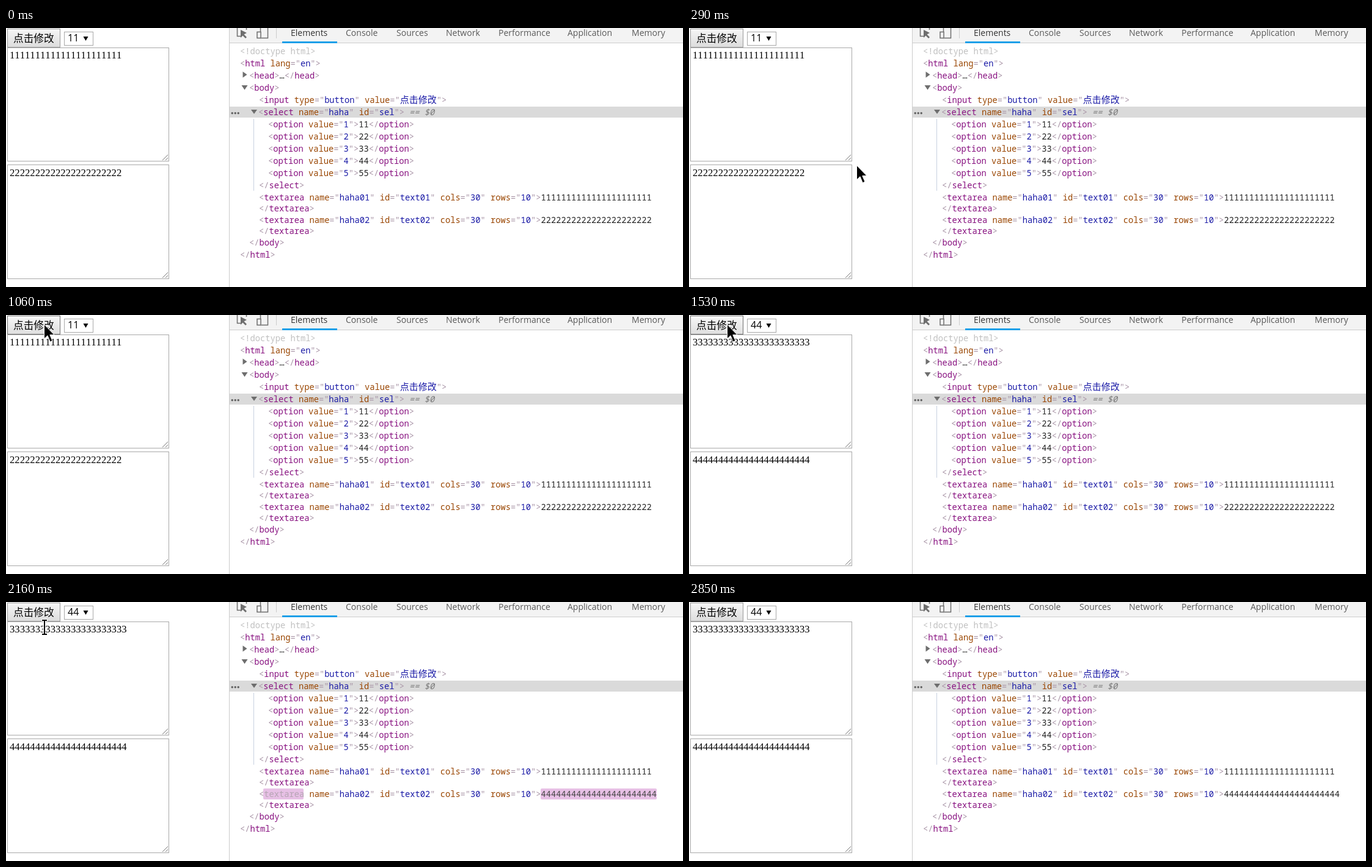
Animation, 1108 px wide and 425 px high, one loop 3330 ms. Source, as an HTML page with a canvas:

```html
<!DOCTYPE html>
<html lang="zh">
<head>
<meta charset="utf-8">
<style>
html, body { margin: 0; width: 100%; height: 100%; overflow: hidden; background: #fff; }
canvas { display: block; }
</style>
</head>
<body>
<canvas id="stage" width="1108" height="425"></canvas>
<script>
const ctx = document.getElementById('stage').getContext('2d');
ctx.fontKerning = 'none';
const LOOP = 3330;
const MONO = '13.74px "Noto Sans Mono", monospace';
const CJK = '"Noto Sans CJK SC", "Noto Sans CJK", sans-serif';
const TAG = [168, 148, 166], TEXT = [34, 34, 34], WHITE = [255, 255, 255];

const rgb = c => `rgb(${c.map(Math.round)})`;
const mix = (a, b, p) => a.map((v, i) => v + (b[i] - v) * p);
const lastStep = (steps, t) => steps.filter(s => s <= t).pop();

function rect(x, y, w, h, color) {
  ctx.fillStyle = color;
  ctx.fillRect(x, y, w, h);
}

function frame(x, y, w, h, color) {
  ctx.strokeStyle = color;
  ctx.lineWidth = 1;
  ctx.strokeRect(x + .5, y + .5, w - 1, h - 1);
}

function rounded(x, y, w, h, r, color) {
  ctx.fillStyle = color;
  ctx.beginPath();
  ctx.roundRect(x, y, w, h, r);
  ctx.fill();
}

function path(points, close = true) {
  ctx.beginPath();
  points.forEach(([x, y]) => ctx.lineTo(x, y));
  if (close) ctx.closePath();
}

function poly(points, color) {
  path(points);
  ctx.fillStyle = color;
  ctx.fill();
}

function line(points, color, width = 1) {
  path(points, false);
  ctx.strokeStyle = color;
  ctx.lineWidth = width;
  ctx.stroke();
}

function text(s, x, y, font, color) {
  ctx.font = font;
  ctx.fillStyle = color;
  ctx.fillText(s, x, y);
  return x + ctx.measureText(s).width;
}

// Ease-out curve cubic-bezier(0, 0, .2, 1)
function easeOut(x) {
  let lo = 0, hi = 1;
  for (let i = 0; i < 24; i++) {
    const u = (lo + hi) / 2;
    if (.6 * u * u + .4 * u ** 3 < x) lo = u; else hi = u;
  }
  return 3 * lo * lo - 2 * lo ** 3;
}

// ---- Page on the left ----

function drawButton(state) {
  const [top, bottom, border] = {
    idle: ['#f6f6f6', '#dcdcdc', '#999'],
    hover: ['#f8f8f8', '#dedede', '#707070'],
    pressed: ['#d8d8d8', '#ececec', '#707070']
  }[state];
  const g = ctx.createLinearGradient(0, 1, 0, 32);
  g.addColorStop(0, top);
  g.addColorStop(1, bottom);
  rounded(2, 1, 87, 31, 1, g);
  frame(2, 1, 87, 31, border);
  text('点击修改', 12, 23, '16.67px ' + CJK, '#000');
}

function drawSelect(value) {
  frame(95, 6, 48, 23, '#a9a9a9');
  text(value, 101, 22, '16px "Open Sans", sans-serif', '#000');
  poly([[126.5, 14], [134.5, 14], [130.5, 21]], '#000');
}

function drawTextarea(y, h, baseline, value) {
  frame(2, y, 265, h, '#a9a9a9');
  text(value, 6, baseline, '16.667px "Liberation Serif", serif', '#000');
  const b = y + h - 2;
  line([[256, b], [265, b - 9]], '#777');
  line([[261, b], [265, b - 4]], '#777');
}

function drawPage(t) {
  const changed = t >= 1530;
  const hover = t >= 910 && t < 2160;
  rect(0, 0, 365, 425, '#fff');
  drawButton(t >= 1380 && t < 1530 ? 'pressed' : hover ? 'hover' : 'idle');
  drawSelect(changed ? '44' : '11');
  drawTextarea(32, 187, 50, changed ? '3'.repeat(23) : '1'.repeat(22));
  drawTextarea(224, 188, 243, changed ? '4'.repeat(23) : '2'.repeat(22));
  if (t >= 210 && t < 290) rect(0, 0, 365, 425, 'rgba(111,168,220,.66)');
}

// ---- Inspector on the right ----

const TABS = [['Elements', 466], ['Console', 556], ['Sources', 639], ['Network', 720],
  ['Performance', 806], ['Application', 919], ['Memory', 1024]];

function drawToolbar() {
  rect(366, 0, 742, 24, '#f3f3f3');
  rect(366, 24, 742, 1, '#ccc');
  rect(452, 22, 90, 3, '#1a9fe8');
  rect(442, 0, 1, 17, '#ccc');
  TABS.forEach(([name, x], i) =>
    text(name, x, 13, '14px "Open Sans", sans-serif', i ? '#5a5a5a' : '#333'));
  const ink = '#6e6e6e';
  line([[384, 13.5], [378.5, 13.5], [378.5, 0]], ink, 1.5);
  line([[393.5, 0], [393.5, 3]], ink, 1.5);
  poly([[384, 3], [384, 16], [387.5, 12.5], [392, 17], [394, 15], [389.5, 10.5], [394, 8]], ink);
  line([[416.5, 0], [416.5, 16.5], [428.5, 16.5], [428.5, 0]], ink, 1.5);
  rect(410, 6, 8, 11, '#f3f3f3');
  ctx.strokeStyle = ink;
  ctx.lineWidth = 1.5;
  ctx.strokeRect(411, 6.5, 6, 10);
}

const area = (n, value) =>
  `<textarea name="haha0${n}" id="text0${n}" cols="30" rows="10">${value}`;

const MARKUP = [
  [383, 43, '<!doctype html>'],
  [383, 63, '<html lang="en">'],
  [398, 83, '<head>…</head>'],
  [398, 103, '<body>'],
  [414, 123, '<input type="button" value="点击修改">'],
  [413, 143, '<select name="haha" id="sel">'],
  ...[1, 2, 3, 4, 5].map(n => [429, 143 + 20 * n, `<option value="${n}">${n}${n}</option>`]),
  [414, 263, '</select>'],
  [414, 283, area(1, '1'.repeat(22))],
  [414, 301, '</textarea>'],
  [414, 338, '</textarea>'],
  [398, 357, '</body>'],
  [383, 377, '</html>']
];

function drawMarkup([x, y, src], nameColor = '#881280', textColor = rgb(TEXT)) {
  const put = (s, color) => {
    const font = /[\u4e00-\u9fff]/.test(s) ? '15px ' + CJK : MONO;
    x = text(s, x, y, font, color);
  };
  for (const part of src.split(/(<[^>]*>)/).filter(Boolean)) {
    const tag = part.match(/^(<\/?)(\w+)(.*)>$/);
    if (part.startsWith('<!')) put(part, '#c0c0c0');
    else if (!tag) put(part, textColor);
    else {
      put(tag[1], rgb(TAG));
      put(tag[2], nameColor);
      for (const [, name, value] of tag[3].matchAll(/(\s\w+)="([^"]*)"/g)) {
        put(name, '#994500');
        put('="', rgb(TAG));
        put(value, '#1a1aa6');
        put('"', rgb(TAG));
      }
      put('>', rgb(TAG));
    }
  }
}

const FLASH_START = 1600, FADE = 1120, FLASH_END = 2850;
const FLASH_STEPS = [1610, 1690, 1770, 1850, 1920, 2000, 2160, 2230, 2770];
const INK_STEPS = [...FLASH_STEPS.slice(0, -1), 2460, 2770];

function flashBack(t) {
  const age = lastStep(FLASH_STEPS, t) - FLASH_START;
  const pale = [245, 219, 244];
  return age < FADE
    ? mix([158, 54, 153], pale, easeOut(age / FADE))
    : mix(pale, WHITE, easeOut((age - FADE) / 280));
}

function drawChangedLine(t) {
  const row = [414, 320, area(2, t >= 1610 ? '4'.repeat(23) : '2'.repeat(22))];
  if (t < 1610 || t >= FLASH_END) return drawMarkup(row);
  const back = rgb(flashBack(t));
  const p = easeOut(Math.min(1, (lastStep(INK_STEPS, t) - FLASH_START) / FADE));
  rounded(421, 306, 66, 18, 2, back);
  rounded(875, 306, 190, 18, 2, back);
  drawMarkup(row, rgb(mix(WHITE, TAG, p)), rgb(mix(WHITE, TEXT, p)));
}

function drawInspector(t) {
  rect(366, 0, 742, 425, '#fff');
  rect(365, 0, 1, 425, '#ccc');
  drawToolbar();
  rect(366, 129, 742, 18, '#dadada');
  if (t >= 210 && t < 290) rounded(370, 363, 738, 19, [6, 0, 0, 6], '#e8effc');
  rect(405, 149, 1, 118, '#c8d0e0');
  for (const x of [370, 375, 380]) rounded(x - 1.5, 138, 3.4, 3.4, 1.7, '#5f5f5f');
  poly([[387.5, 71.5], [394.5, 76.5], [387.5, 81.5]], '#6e6e6e');
  poly([[385.5, 94], [395.5, 94], [390.5, 101.5]], '#6e6e6e');
  poly([[401, 134], [411, 134], [406, 141]], '#6e6e6e');
  MARKUP.forEach(row => drawMarkup(row));
  text('== $0', 660, 143, 'italic ' + MONO, '#777');
  drawChangedLine(t);
}

// ---- Pointer ----

const MOVES = [
  [210, 282, 222], [290, 274, 225], [440, 253, 204], [520, 216, 168], [600, 175, 126],
  [680, 138, 89], [750, 107, 58], [830, 85, 36], [910, 67, 17], [980, 64, 16],
  [1060, 62, 15], [2160, 63, 41]
];

function drawArrow(x, y) {
  path([[.5, .5], [.5, 24], [6, 18.8], [10.2, 29], [14, 27.3], [9.8, 17.6], [17, 17.6]]
    .map(([dx, dy]) => [x + dx, y + dy]));
  ctx.fillStyle = '#000';
  ctx.fill();
  ctx.strokeStyle = '#fff';
  ctx.lineWidth = 1;
  ctx.stroke();
}

function drawBeam(x, y) {
  for (const [grow, color] of [[1, '#fff'], [0, '#000']]) {
    for (const [dx, dy, w, h] of [[-1, -11, 2, 23], [-4, -12, 8, 2], [-4, 11, 8, 2]])
      rect(x + dx - grow, y + dy - grow, w + 2 * grow, h + 2 * grow, color);
  }
}

function drawPointer(t) {
  if (t < 210 || t >= 2230) return;
  const [, x, y] = MOVES.filter(m => m[0] <= t).pop();
  const overField = x < 267 && y > 32 && y < 219;
  (overField ? drawBeam : drawArrow)(x, y);
}

function render(now) {
  const t = now % LOOP;
  drawPage(t);
  drawInspector(t);
  drawPointer(t);
}

let start;
function tick(now) {
  start ??= now;
  render(Math.max(0, now - start));
  requestAnimationFrame(tick);
}
render(0);
requestAnimationFrame(tick);
</script>
</body>
</html>
```
